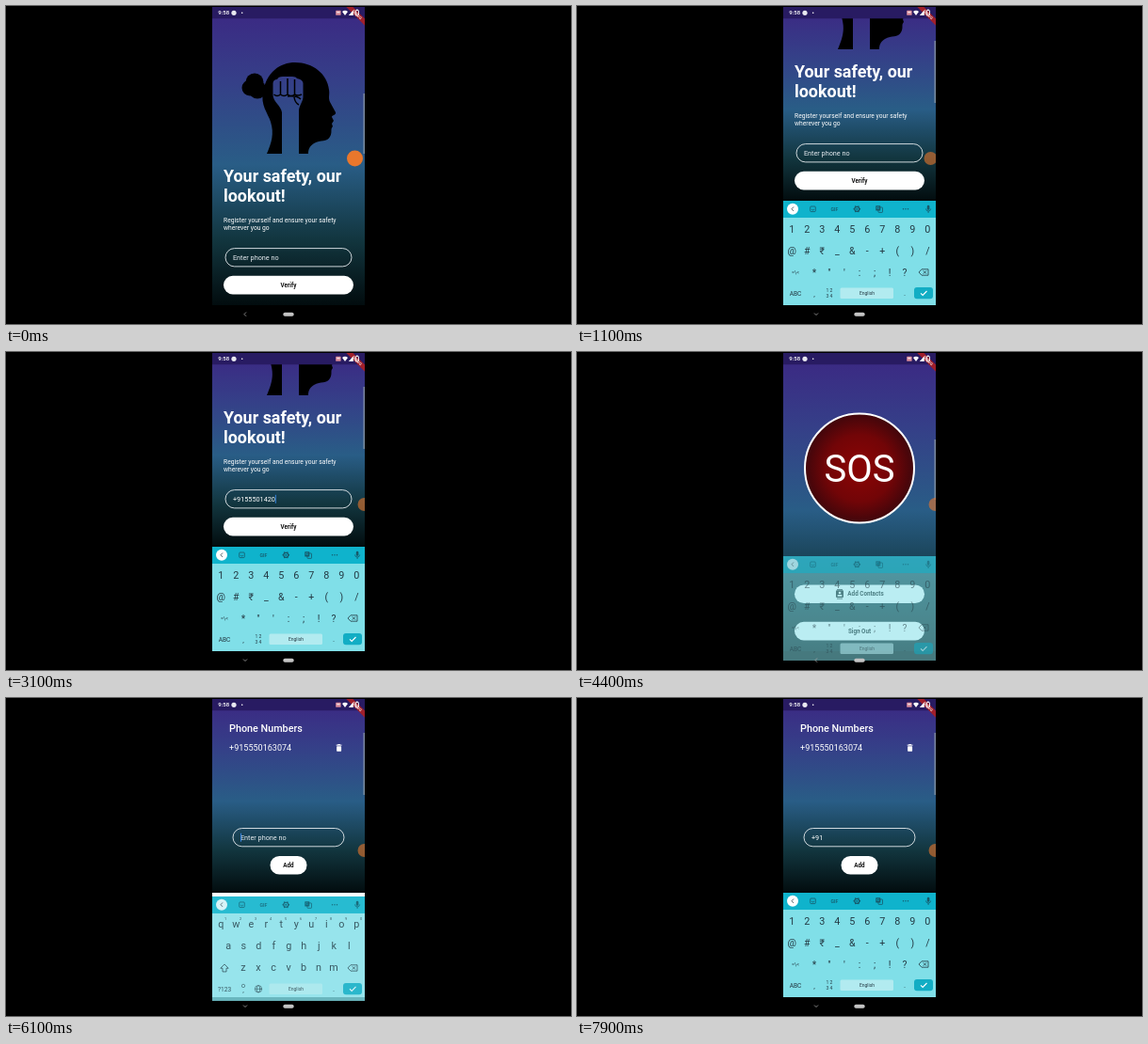
These frames come from a looping animation (600x338 px, 8 s). An HTML page with a canvas:

```html
<!DOCTYPE html>
<html lang="en">
<head>
<meta charset="utf-8">
<title>Safety app walkthrough</title>
<style>
html, body { margin: 0; width: 100%; height: 100%; overflow: hidden; background: #000; }
canvas { display: block; width: 600px; height: 338px; }
</style>
</head>
<body>
<canvas id="stage" width="600" height="338"></canvas>
<script>
const c = document.getElementById('stage').getContext('2d');
const LOOP = 8000, LEFT = 219, WIDTH = 162, FULL = 318, SHORT = 207;
const LIFT = FULL - SHORT;
const INK = '#243a44';
const OWN_NO = '+915550142030', SAVED_NO = '+915550163074';

const ramp = (t, a, b) => Math.min(1, Math.max(0, (t - a) / (b - a)));
const easeOut = p => 1 - (1 - p) ** 3;

// y is the middle of the capitals
function text(s, x, y, size, { color = '#fff', weight = 400, align = 'left' } = {}) {
  c.font = `${weight} ${size}px Roboto, Arial, sans-serif`;
  c.fillStyle = color;
  c.textAlign = align;
  c.fillText(s, x, y + size * 0.355);
}
const centered = (s, x, y, size, color = INK, weight = 400) =>
  text(s, x, y, size, { color, weight, align: 'center' });

function rect(x, y, w, h, color) {
  c.fillStyle = color;
  c.fillRect(x, y, w, h);
}
function round(x, y, w, h, r, fill, stroke, line = 0.9) {
  c.beginPath();
  c.roundRect(x, y, w, h, r);
  if (fill) { c.fillStyle = fill; c.fill(); }
  if (stroke) { c.strokeStyle = stroke; c.lineWidth = line; c.stroke(); }
}
function disc(x, y, r, fill) {
  c.beginPath();
  c.arc(x, y, r, 0, 7);
  c.fillStyle = fill;
  c.fill();
}
function shape(d, fill) {
  c.fillStyle = fill;
  c.fill(new Path2D(d), 'evenodd');
}
function line(d, color, width = 0.8) {
  c.strokeStyle = color;
  c.lineWidth = width;
  c.stroke(new Path2D(d));
}
function layer(alpha, dy, draw) {
  c.save();
  c.globalAlpha *= alpha;
  c.translate(0, dy);
  draw();
  c.restore();
}

function backdrop(height) {
  const g = c.createLinearGradient(0, 0, 0, height);
  g.addColorStop(0, '#3c2783');
  g.addColorStop(0.25, '#353f88');
  g.addColorStop(0.53, '#295d86');
  g.addColorStop(0.78, '#12363f');
  g.addColorStop(1, '#020c0e');
  rect(LEFT, 0, WIDTH, height, g);
}

function pill(label, x, y, w, labelX = x + w / 2) {
  round(x, y, w, 19.6, 9.8, '#fff');
  centered(label, labelX, y + 9.8, 6.3, '#111', 700);
}

function field(x, y, w, typed, cursor) {
  round(x, y, w, 19.3, 9.65, null, '#e4e9ec', 0.9);
  const size = 7.25, tx = x + 8, mid = y + 9.7;
  text(typed || 'Enter phone no', tx, mid, size, { color: typed ? '#fff' : '#e9eef2' });
  if (cursor) rect(tx + (typed ? c.measureText(typed).width : 0), mid - 4.5, 0.9, 9, '#3b8df0');
}

const HEAD = `M277 157C282 145 285 136 281 123C278 114 270 105 273 91C277 70 291 60 307 60
  C326 60 341 72 343 89C344 94 342 97 344 102L350 113C351 116 346 116 346 118L348 122L346 125
  L347 128C344 131 347 134 344 139C341 145 334 142 327 146C322 149 321 153 321 157Z`;
const ARM = `M293 157V113C292 106 284 102 283.500 95V82Q284 78 288 78Q289 75 294 75H304
  Q308 75 309 77Q315 78 315.500 82V95C316 102 311 105 311 112V157Z`;

function portrait() {
  disc(264, 81, 9.5, '#000');
  disc(259, 87, 8.5, '#000');
  disc(267, 89, 9.5, '#000');
  shape(HEAD + ARM, '#000');
  line(`M284.500 94Q288 97 291.500 94V80M291.500 94Q295 97 299 94V77M299 94Q303 97 306.500 94V78
    M306.500 94Q310 96 314 94M299 96Q309 95 313 99M306 97Q307 103 311 105`, '#000', 1.5);
}

function login(t, open, typed, cursor) {
  backdrop(open ? SHORT : FULL);
  layer(1, -LIFT * open, () => {
    portrait();
    text('Your safety, our', 231, 180.5, 17.9, { weight: 700 });
    text('lookout!', 231, 201.7, 17.9, { weight: 700 });
    text('Register yourself and ensure your safety', 231, 228, 6.73);
    text('wherever you go', 231, 236, 6.73);
    field(233, 257.6, 134, typed, cursor);
    pill('Verify', 231, 286.8, 138);
  });
}

function home() {
  backdrop(FULL);
  const g = c.createRadialGradient(300, 123.5, 8, 300, 123.5, 58);
  g.addColorStop(0, '#870505');
  g.addColorStop(0.55, '#720507');
  g.addColorStop(1, '#40060b');
  disc(300, 123.5, 58, g);
  c.strokeStyle = '#fff';
  c.lineWidth = 2;
  c.stroke();
  centered('SOS', 300, 123.5, 40, '#fff');
  pill('Add Contacts', 231, 247.4, 138, 306.5);
  round(275, 253.3, 8, 7.8, 1, '#111');
  rect(276, 252, 6, 0.8, '#111');
  rect(276, 261.7, 6, 0.8, '#111');
  disc(279, 256, 1.3, '#fff');
  round(276.5, 258, 5, 1.8, 0.9, '#fff');
  pill('Sign Out', 231, 286.8, 138);
}

function contacts(open, typed, cursor) {
  backdrop(open ? SHORT : FULL);
  text('Phone Numbers', 237, 32, 10.8, { weight: 500 });
  text(SAVED_NO, 237, 52.8, 9.05);
  rect(350.7, 49.6, 5.8, 1, '#fff');
  rect(352.3, 49, 2.6, 1, '#fff');
  round(351.1, 51.2, 5, 5.6, 0.7, '#fff');
  const dy = open ? 0 : LIFT;
  field(241, 138.5 + dy, 118, typed, cursor);
  pill('Add', 280.5, 168 + dy, 39);
}

function keyRow(keys, x, y, size = 10.8) {
  [...keys].forEach((k, i) => centered(k, x + 16 * i, y, size));
}

function toolbar() {
  rect(LEFT, SHORT, WIDTH, 18, '#0fb3cc');
  disc(229, 215.7, 6, '#fff');
  line('M230 213.500L228 215.700L230 217.900', INK);
  const tint = '#17596a';
  round(247.7, 213, 5.6, 5.6, 1, null, tint, 0.8);
  line('M249 216Q250.500 218 252 216', tint);
  centered('GIF', 273.5, 215.8, 5.2, tint, 500);
  c.beginPath();
  c.arc(297.3, 215.8, 2.5, 0, 7);
  c.strokeStyle = tint;
  c.lineWidth = 1.2;
  c.stroke();
  disc(297.3, 215.8, 0.9, tint);
  for (let i = 0; i < 6; i++) {
    const a = i * Math.PI / 3;
    disc(297.3 + 3.2 * Math.cos(a), 215.8 + 3.2 * Math.sin(a), 0.7, tint);
  }
  round(317.3, 212.2, 5, 5.4, 0.6, tint);
  round(320, 214, 4.5, 5.4, 0.6, null, tint, 0.8);
  centered('G', 319.6, 214.8, 3.8, '#0fb3cc', 700);
  for (const x of [346.5, 349, 351.5]) disc(x, 215.8, 0.7, tint);
  round(371.8, 211.8, 2.6, 5, 1.3, tint);
  line('M370.500 215.500Q370.800 218 373.100 218Q375.400 218 375.700 215.500M373.100 218V220', tint);
}

function keyboard(numeric) {
  rect(LEFT, SHORT, WIDTH, LIFT, '#80dfe8');
  toolbar();
  if (numeric) {
    keyRow('1234567890', 228.3, 237, 10.8);
    keyRow('@#₹_&-+()/', 228.3, 260, 10.5);
    keyRow('*"\':;!?', 252, 283, 10.5);
    centered('=\\<', 232, 283, 5.3);
    centered('ABC', 232, 305.3, 6.6);
    centered('1 2', 268, 302.6, 5);
    centered('3 4', 268, 308, 5);
  } else {
    keyRow('qwertyuiop', 228.3, 236.5);
    keyRow('1234567890', 233, 230.8, 3.8);
    keyRow('asdfghjkl', 236.3, 259.5);
    keyRow('zxcvbnm', 252, 282.5);
    line('M232 279L227.800 283.300H230V287H234V283.300H236.200Z', INK);
    centered('?123', 232, 305.3, 6.6);
    c.beginPath();
    c.arc(252, 302, 1.7, 0, 7);
    c.moveTo(271.7, 305.3);
    c.arc(268, 305.3, 3.7, 0, 7);
    c.ellipse(268, 305.3, 1.7, 3.7, 0, 0, 7);
    c.strokeStyle = INK;
    c.lineWidth = 0.6;
    c.stroke();
    line('M264.300 305.300H271.700', INK, 0.6);
  }
  centered(',', 252, 306, 8);
  centered('.', 348, 305, 8);
  line('M363 283L366 279.800H373V286.200H366ZM367.800 281.400L371 284.600M371 281.400L367.800 284.600', INK);
  round(279.5, 299.5, 56.5, 11.5, 1.5, '#b2ebf0');
  centered('English', 308, 305.3, 5);
  round(358, 299, 20, 12.3, 3, '#12adc4');
  line('M365 305.300L367.200 307.500L371.500 303', '#fff', 1.1);
}

function chrome(resized, showDown) {
  rect(LEFT, 0, WIDTH, 13.3, '#281b62');
  // corner ribbon
  layer(1, 0, () => {
    c.translate(381, 1);
    c.rotate(Math.PI / 4);
    rect(-22, 8.9, 44, 5, '#a01f2b');
    centered('DEBUG', 0, 11.5, 3.9, '#f3dede', 700);
  });
  text('9:58', 225.3, 7.3, 6, { weight: 500 });
  disc(242, 7.3, 2.6, '#e8e8f0');
  disc(250.7, 7.3, 0.8, '#fff');
  round(350.2, 4.8, 5.4, 5, 0.6, '#d98c9b');
  rect(351.3, 6.2, 3.2, 1, '#fff');
  shape('M357 6Q360 3.400 363 6L360 10Z', '#fff');
  shape('M363.800 10H368.800V4.500Z', '#fff');
  round(371.2, 4.6, 3.3, 5.5, 0.5, null, '#fff', 0.9);
  rect(372, 3.6, 1.7, 1, '#fff');
  rect(379.6, resized ? 37 : 93, 1.2, resized ? 66 : 64, '#8d9aa6');
  round(294.3, 325.7, 11.4, 4, 2, '#c4c4c4');
  line(showDown ? 'M252 326.500L254 328.500L256 326.500' : 'M255 325.500L253 327.600L255 329.700', '#aaa');
}

function bubble(t) {
  const x = 370.5 + 5 * easeOut(ramp(t, 800, 1050)) + 5 * ramp(t, 1150, 1400);
  const dim = ramp(t, 800, 1000);
  layer(1 - 0.4 * dim, 0, () => disc(x, 162, 8.5 - 1.5 * dim, '#e9772c'));
}

// Number of typed characters and the time of the last input event
function typing(t, start, step, max, focus) {
  const n = t < start ? 0 : Math.min(max, Math.floor((t - start) / step) + 1);
  const last = n ? start + (n - 1) * step : focus;
  const cursor = t >= focus && Math.floor((t - last) / 500) % 2 === 0;
  return { n, cursor };
}

function pushPage(p, draw) {
  if (p > 0) layer(p, 80 * (1 - easeOut(p)), draw);
}

function render(t) {
  c.globalAlpha = 1;
  rect(0, 0, 600, 338, '#000');
  c.save();
  c.beginPath();
  c.rect(LEFT, 1, WIDTH, 337);
  c.clip();

  const homeIn = ramp(t, 4000, 4280), contactsIn = ramp(t, 5350, 5620);
  const kb = t < 4310 ? ramp(t, 500, 720) : t < 5000 ? 1 - ramp(t, 4310, 4510) : ramp(t, 5900, 6145);
  const resized = t >= 500 && t < 4310 || t >= 5900;

  if (resized) rect(LEFT, SHORT, WIDTH, LIFT, '#fff');
  if (homeIn < 1) {
    const { n, cursor } = typing(t, 1400, 160, 13, 500);
    login(t, easeOut(ramp(t, 500, 650)), OWN_NO.slice(0, n), cursor);
  }
  if (contactsIn < 1) pushPage(homeIn, home);
  const entry = typing(t, 7000, 150, 3, 5700);
  pushPage(contactsIn, () => contacts(t >= 5900, '+91'.slice(0, entry.n), entry.cursor));

  rect(LEFT, FULL, WIDTH, 20, '#000');
  if (kb > 0) {
    const numeric = t > 1000 && t < 5000 || t > 6700;
    layer(kb, 22 * (1 - kb), () => keyboard(numeric));
  }
  chrome(resized, kb > 0.6);
  bubble(t);
  c.restore();
}

function tick() {
  render(performance.now() % LOOP);
  requestAnimationFrame(tick);
}
tick();
</script>
</body>
</html>
```
